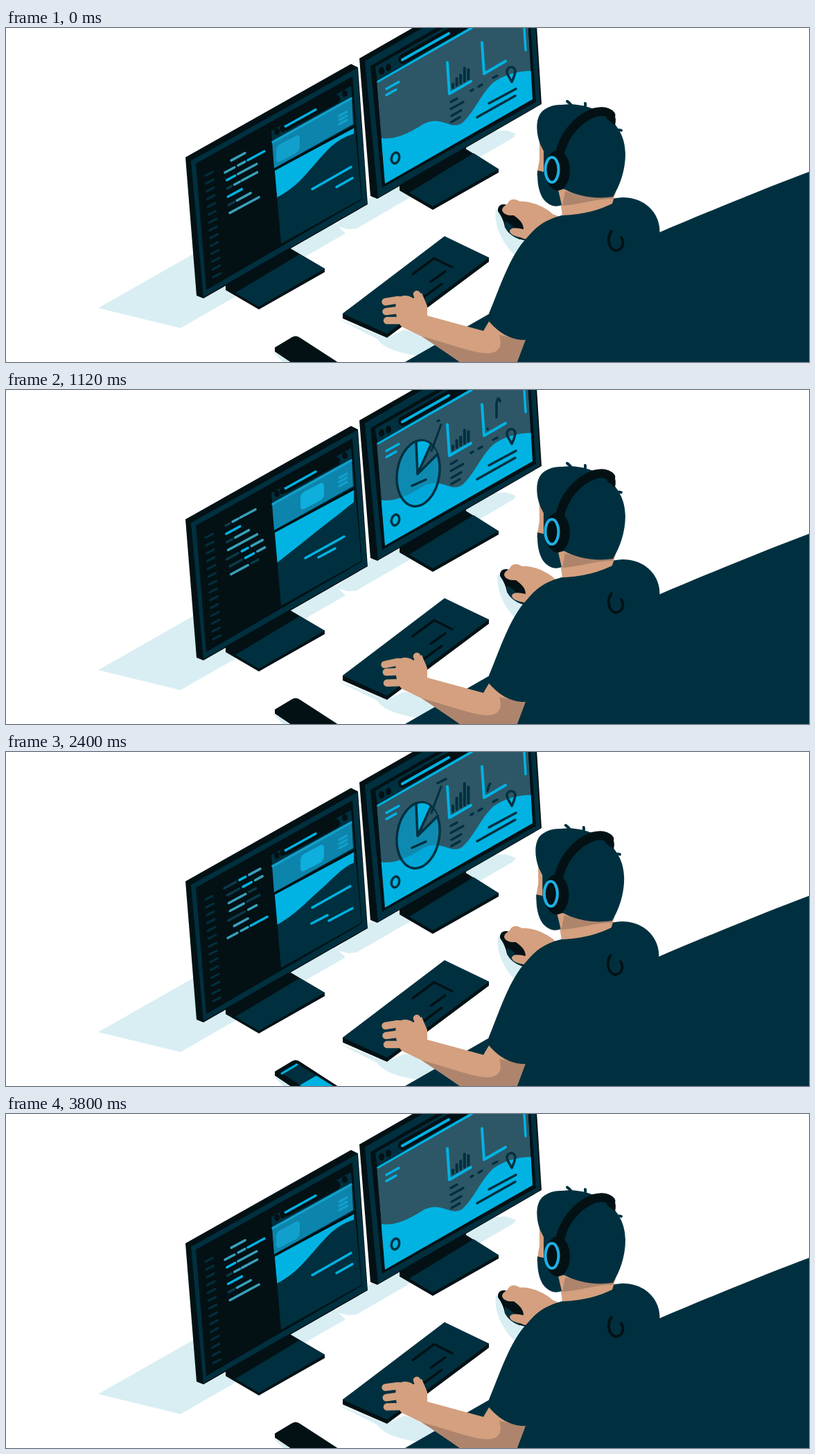
An HTML page for the animation above (3.84 s loop, 1159 by 483 pixels).

```html
<!DOCTYPE html>
<html lang="en">
<head>
<meta charset="utf-8">
<title>Developer at a desk</title>
<style>
  html, body { margin: 0; height: 100%; overflow: hidden; background: #fff; }
  svg { display: block; width: 100%; height: 100%; }
  .navy { fill: #00303f; } .black { fill: #031115; } .cyan { fill: #00b3e3; }
  .skin { fill: #d4a07f; } .shade { fill: #ae856c; } .pale { fill: #d8eef3; }
  .slate { fill: #2d5767; } .teal { fill: #0d84ab; }
  .line { fill: none; stroke-width: 3.5; stroke-linecap: round; stroke-linejoin: round; }
  .sn { stroke: #00303f; } .sb { stroke: #031115; } .sc { stroke: #00b3e3; } .ss { stroke: #d4a07f; }
</style>
</head>
<body>
<svg viewBox="0 0 1159 483" preserveAspectRatio="none">
  <clipPath id="stageL"><path d="M383 150L499 86 513 247 397 311Z"/></clipPath>
  <clipPath id="stageR"><path d="M535 77L751-48 760 103 547 225Z"/></clipPath>

  <!-- desk shadows -->
  <path class="pale" d="M133 405L270 327 400 290 472 280 490 297 252 434Z
    M474 286L560 220 690 150 722 148 736 153 733 158 506 290 494 291Z
    M479 421L550 448 575 436 606 446 655 483 605 475Q550 470 535 449Z
    M385 468L416 483H400Z"/>

  <!-- stands -->
  <path class="black" d="M317 360L411 305V319L460 348V353L365 407 317 379Z M568 216L664 162V175L711 204V209L616 263 568 235Z"/>
  <path class="navy" d="M331 383L424 327 460 348 365 403Z M582 238L675 181 711 204 616 258Z"/>

  <!-- left monitor -->
  <path class="black" d="M259 187L498 52 508 57 522 255 285 391 275 387Z"/>
  <path class="navy" d="M267 192L507 58 521 254 285 389Z"/>
  <path class="black" d="M274 196L500 70 514 248 289 379Z"/>
  <path class="navy" d="M383 149L498 84 513 247 397 312Z"/>
  <path class="teal" d="M384 164L499 100 501 139 387 203Z"/>
  <path class="line" stroke="#12a0cc" stroke-width="3" d="M385 165L498 102M481 127L492 121M481 133L492 127M481 139L492 133"/>
  <path class="line sb" style="stroke-width:13" d="M404 142L476 103"/>
  <path class="line sc" d="M402 143L447 118"/>
  <g class="black"><ellipse cx="391" cy="150" rx="4" ry="5"/><ellipse cx="399" cy="146" rx="4" ry="5"/><ellipse cx="489" cy="95" rx="4" ry="5"/></g>
  <path class="line sn" style="stroke-width:3" id="gutter"/>
  <g id="code"></g>
  <g clip-path="url(#stageL)">
    <path class="cyan" id="wave"/>
    <path class="line sb" d="M385 206L503 142"/>
    <rect id="card" x="-17" y="-12" width="34" height="25" rx="6"/>
    <path class="line sc" id="notes"/>
    <path class="line sc" id="extra" pathLength="1" d="M500 226L466 244"/>
  </g>

  <!-- right monitor -->
  <path class="black" d="M510 44L592-3H766L773 110 536 247 526 243Z"/>
  <path class="navy" d="M518 48L608-4H764L771 110 537 245Z"/>
  <path class="black" d="M526 55L628-4H757L765 107 543 231Z"/>
  <path class="navy" d="M533 56L640-5H752L754 0 536 77Z"/>
  <g clip-path="url(#stageR)">
    <path class="slate" d="M535 77L751-48 760 103 547 225Z"/>
    <path class="cyan" d="M535 158C562 165 586 149 604 138C630 126 642 149 659 137C677 120 683 99 703 79Q728 61 764 62V110L540 235Z"/>
    <path class="line sc" d="M537 77L672 0M748 0L750 32"/>
  </g>
  <path class="line sb" style="stroke-width:14" d="M573 45L660-4"/>
  <path class="line sc" style="stroke-width:4" d="M572 46L639 8"/>
  <g class="black"><ellipse cx="542" cy="62" rx="4" ry="5.5"/><ellipse cx="552" cy="57" rx="4" ry="5.5"/></g>
  <path class="line sc" d="M549 88L567 78M549 97L563 89"/>
  <path class="line sc" style="stroke-width:4" d="M637 50L640 95 671 77M687 21L690 66 721 48"/>
  <path class="line sn" d="M642 107L651 102M642 117L660 107M643 127L657 119M643 136L655 129M671 91L674 89M682 85L687 82M703 72L709 69"/>
  <path class="line sn" d="M697 109L736 88M680 129L735 98M730 78C726 70 722 66 723 62C725 54 735 55 735 63Q734 70 730 78Z"/>
  <ellipse class="line sn" cx="562" cy="188" rx="5.5" ry="8" transform="rotate(15 562 188)"/>
  <path class="line sn" style="stroke-width:4" id="bars"/>
  <path class="line sn" id="graph" d="M695 56Q698 44 700 46T704 49L708 44V38L708 20Q710 8 712 14T719 10"/>
  <g id="pie">
    <g transform="rotate(9)">
      <ellipse rx="30.5" ry="48" fill="#00a3d4" opacity=".68"/>
      <ellipse class="line sn" rx="30.5" ry="48"/>
    </g>
    <path class="cyan" d="M-1 1L-3-44Q8-50 18-41Z"/>
    <path class="slate" d="M-1 1L18-41Q24-36 28-28Z"/>
    <path class="line sn" d="M-1 1L-3-44M-1 1L18-41M-1 1L28-28M-9 18L11 9"/>
  </g>
  <path class="line sn" id="callout" pathLength="1" style="stroke-width:3" d="M614 88L628 50"/>
  <path class="line sn" id="tag" pathLength="1" d="M623 45L635 39"/>

  <!-- phone -->
  <path class="black" d="M388 462L413 447Q418 444 423 447L480 484H412L388 468Z"/>
  <g id="phoneA">
    <path class="navy" d="M396 463L419 450 472 483H427Z"/>
    <path class="cyan" d="M396 463L419 450 443 465 420 479ZM460 483L465 479 472 483Z"/>
  </g>
  <g id="phoneB">
    <path class="navy" d="M396 463L419 450 472 483H427Z"/>
    <path class="cyan" d="M424 482L448 468 472 483H426Z"/>
    <path class="line sc" style="stroke-width:3" d="M398 465L420 452"/>
  </g>

  <!-- keyboard -->
  <path class="black" d="M486 413L633 302 697 332V338L550 448 486 420Z"/>
  <path class="navy" d="M486 413L633 301 697 332 550 442Z"/>
  <path class="line sb" d="M587 356L618 333 644 346M613 367L634 352M603 389L629 370"/>

  <!-- chair, typing arm -->
  <path class="navy" d="M576 483L698 413 942 296C1010 267 1090 234 1159 208V483Z"/>
  <path class="skin" d="M563 392C570 386 580 385 588 391L600 383 608 402V416L689 438 699 421 750 451 738 483H655Q625 462 600 446L571 432Q560 420 563 392Z"/>
  <path class="shade" d="M600 446C640 456 680 473 700 470C716 467 715 455 712 444L750 451 738 483H655Q625 462 600 446Z"/>
  <path class="line ss" style="stroke-width:10.5" id="fingers"/>

  <!-- mouse arm -->
  <g id="mouse">
    <path class="pale" d="M707 262C703 290 722 320 742 335L764 306Z"/>
    <path class="black" d="M710 265C709 255 719 251 730 260L752 285 760 308C742 308 728 302 720 288Q718 276 710 265Z"/>
    <path class="navy" d="M720 279Q736 286 742 306Q726 300 720 288Z"/>
    <path class="skin" d="M716 264C716 257 723 257 725 252C729 246 736 247 742 251C754 249 778 258 789 269L806 276 768 312 757 306Q748 306 743 303C735 301 727 299 727 293C730 287 740 290 747 291C747 282 740 276 733 271Q719 272 716 264Z"/>
  </g>

  <!-- person -->
  <g id="person">
    <path class="navy" d="M697 413C712 378 727 328 753 302C772 279 790 272 830 265C855 259 863 246 890 245C927 245 947 274 943 300L1000 483H738L750 451C730 452 711 441 697 424Z"/>
    <path class="skin" d="M803 271L800 250 795 230 808 232C840 246 870 243 880 238L875 254C858 262 835 270 803 271Z"/>
    <path class="shade" d="M803 257L807 236C840 246 865 244 878 240L876 247C850 247 830 255 803 257Z"/>
    <path class="skin" d="M770 162L784 160V210L766 213 770 190Z"/>
    <path class="navy" d="M771 168C764 150 764 126 777 118Q788 110 803 111C842 106 894 130 894 182C894 206 886 228 876 244C850 248 824 243 806 233L797 234 802 256C790 261 780 254 774 245C767 232 767 218 767 206L776 208V178Z"/>
    <path class="line sn" style="stroke-width:4" d="M819 117Q815 109 810 106M834 118Q837 113 836 109M880 151Q883 146 888 148"/>
    <path class="line sb" style="stroke-width:13" d="M799 185C803 157 824 131 850 122Q866 118 873 126"/>
    <path class="black" d="M862 116Q884 120 879 141L868 132Z"/>
    <ellipse class="black" cx="796" cy="206" rx="18" ry="29"/>
    <ellipse class="black" cx="788" cy="205" rx="9.5" ry="18" stroke="#1fb0e2" stroke-width="4"/>
    <path class="line sb" style="stroke-width:4" d="M874 294C867 303 869 319 880 322C890 321 893 311 888 303"/>
  </g>
</svg>
<script>
const $ = id => document.getElementById(id);
const LOOP = 3840, HALF = LOOP / 2;
const clamp = x => Math.min(1, Math.max(0, x));
const mix = (a, b, k) => a.map((v, i) => v + (b[i] - v) * k);
const ease = x => x * x * (3 - 2 * x);
const ramp = (t, a, b) => ease(clamp((t - a) / (b - a)));
const show = (id, on) => $(id).style.visibility = on ? "visible" : "hidden";

// Reveals the first part k of a stroke whose pathLength is 1.
function draw(id, k) {
  show(id, k > 0.01);
  $(id).setAttribute("stroke-dasharray", `${k} 2`);
}

// Code rows: [start, end, tone]
const tones = ["#0b3a4a", "#3aa0bb", "#00b3e3"];
const rows = [
  [[10, 30, 1]],
  [[0, 14, 1], [19, 29, 1], [33, 57, 2]],
  [[2, 14, 2], [18, 45, 1]],
  [[2, 8, 0], [12, 20, 1], [23, 45, 1]],
  [[2, 22, 2]],
  [[2, 10, 0], [14, 34, 1]],
  [[3, 45, 1]]
];
let seed = 11;
const rnd = () => (seed = seed * 16807 % 2147483647) / 2147483647;
while (rows.length < 12) {
  const row = [];
  for (let u = rnd() * 8; u < 46;) {
    const len = 8 + rnd() * 20;
    row.push([u, Math.min(58, u + len), Math.floor(rnd() * 3)]);
    u += len + 5;
  }
  rows.push(row);
}

function drawCode(t) {
  const pos = t / 320, first = Math.floor(pos);
  const slide = ease(clamp((pos - first) * 2 - 1));
  let out = "";
  for (let r = 0; r < 8; r++) {
    const v = (r - slide) * 12;
    const limit = r < 7 ? 60 : 60 * clamp((pos - first) * 2 - 1);
    if (r === 0 && slide > 0.5) continue;
    for (const [a, b, tone] of rows[(first + r) % 12]) {
      if (a >= limit) continue;
      const e = Math.min(b, limit), x = 315 + v * 0.07, y = 197 + v;
      out += `<path class="line" stroke="${tones[tone]}" d="M${x + a} ${y - a * 0.54}L${x + e} ${y - e * 0.54}"/>`;
    }
  }
  $("code").innerHTML = out;
}

// Slides: card x, y | wave right y, two curves, left y | two note lines
const slides = [
  [407, 174, 153, 478, 160, 465, 175, 450, 192, 432, 212, 420, 230, 245, 442, 233, 498, 201, 477, 230, 500, 217],
  [442, 153, 160, 484, 168, 472, 183, 455, 198, 437, 213, 420, 234, 250, 442, 225, 497, 194, 441, 248, 464, 236],
  [442, 153, 162, 480, 180, 468, 189, 450, 203, 430, 219, 410, 235, 250, 432, 243, 488, 212, 451, 242, 475, 229]
];

function drawSlide(t) {
  const p = t % HALF;
  const toB = ramp(p, 240, 440), toC = ramp(p, 860, 1080), toA = ramp(p, 1360, 1580);
  const s = mix(mix(mix(slides[0], slides[1], toB), slides[2], toC), slides[0], toA);
  $("card").setAttribute("transform", `translate(${s[0]} ${s[1]}) skewY(-28)`);
  const c = mix([17, 160, 203], [14, 174, 221], toB * (1 - toA));
  $("card").setAttribute("fill", `rgb(${c})`);
  $("wave").setAttribute("d", `M387 206L502 145V${s[2]}C${s.slice(3, 5)} ${s.slice(5, 7)} ${s.slice(7, 9)}C${s.slice(9, 11)} ${s.slice(11, 13)} 391 ${s[13]}Z`);
  $("notes").setAttribute("d", `M${s.slice(14, 16)}L${s.slice(16, 18)}M${s.slice(18, 20)}L${s.slice(20)}`);
}

const graphLen = $("graph").getTotalLength();
function drawGraph(p) {
  const head = clamp((p - 340) / 900) * graphLen, tail = clamp((p - 780) / 860) * graphLen;
  show("graph", head - tail > 0.1);
  $("graph").setAttribute("stroke-dasharray", `0 ${tail} ${head - tail} 200`);
}

function drawBars(t) {
  const bump = t > 1300 && t < 3100 ? Math.sin(Math.PI * (t - 1300) / 1800) ** 2 : 0;
  $("bars").setAttribute("d", [5, 10, 12, 19, 14].map((h, i) =>
    `M${645 + i * 5.6} ${86 - i * 3}v${-h * (1 + 0.75 * bump)}`).join(""));
}

// Mouse stops: time, x, y
const stops = [[0, 0, 0], [600, 7, 0], [1120, 3, 4], [2400, 3, 4], [3200, 0, 0], [LOOP, 0, 0]];
function drawBody(t) {
  const i = stops.findIndex(s => s[0] > t), a = stops[i - 1], b = stops[i];
  const [, x, y] = mix(a, b, ramp(t, a[0], b[0]));
  $("mouse").setAttribute("transform", `translate(${x} ${y})`);
  const p = t % HALF;
  const lean = p < 1200 ? Math.sin(Math.PI * p / 1200) ** 2 * 0.0065 : 0;
  $("person").setAttribute("transform", `matrix(1 0 ${lean} 1 ${-483 * lean} 0)`);
  const tap = n => 1.2 * Math.sin(t / LOOP * 2 * Math.PI * 8 + n * 2);
  $("fingers").setAttribute("d", `M${547 + tap(1) / 2} ${396 + tap(0)}L566 393M${549 + tap(2) / 2} ${409 + tap(1)}L572 407M550 ${424 + tap(2)}L574 423M593 385L601 404`);
}

$("gutter").setAttribute("d", Array.from({ length: 14 }, (_, i) =>
  `M${288 + i * 0.85} ${213.5 + i * 11.3}l10.5 -5.5`).join(""));

function frame(now) {
  const t = now % LOOP;
  drawCode(t);
  drawSlide(t);
  drawGraph(t % HALF);
  drawBars(t);
  drawBody(t);
  draw("extra", ramp(t, 1170, 1280) * (1 - ramp(t, 3420, 3640)));
  const size = ramp(t, 120, 480) * (1 - ramp(t, 3140, 3500));
  show("pie", size > 0.01);
  $("pie").setAttribute("transform", `translate(595 120.5) scale(${size})`);
  draw("callout", ramp(t, 480, 1040) * (1 - ramp(t, 2720, 3120)));
  draw("tag", ramp(t, 1020, 1400) * (1 - ramp(t, 2560, 2800)));
  show("phoneA", t >= 1400 && t < 2000);
  show("phoneB", t >= 2000 && t < 3500);
  requestAnimationFrame(frame);
}
frame(0);
</script>
</body>
</html>
```
